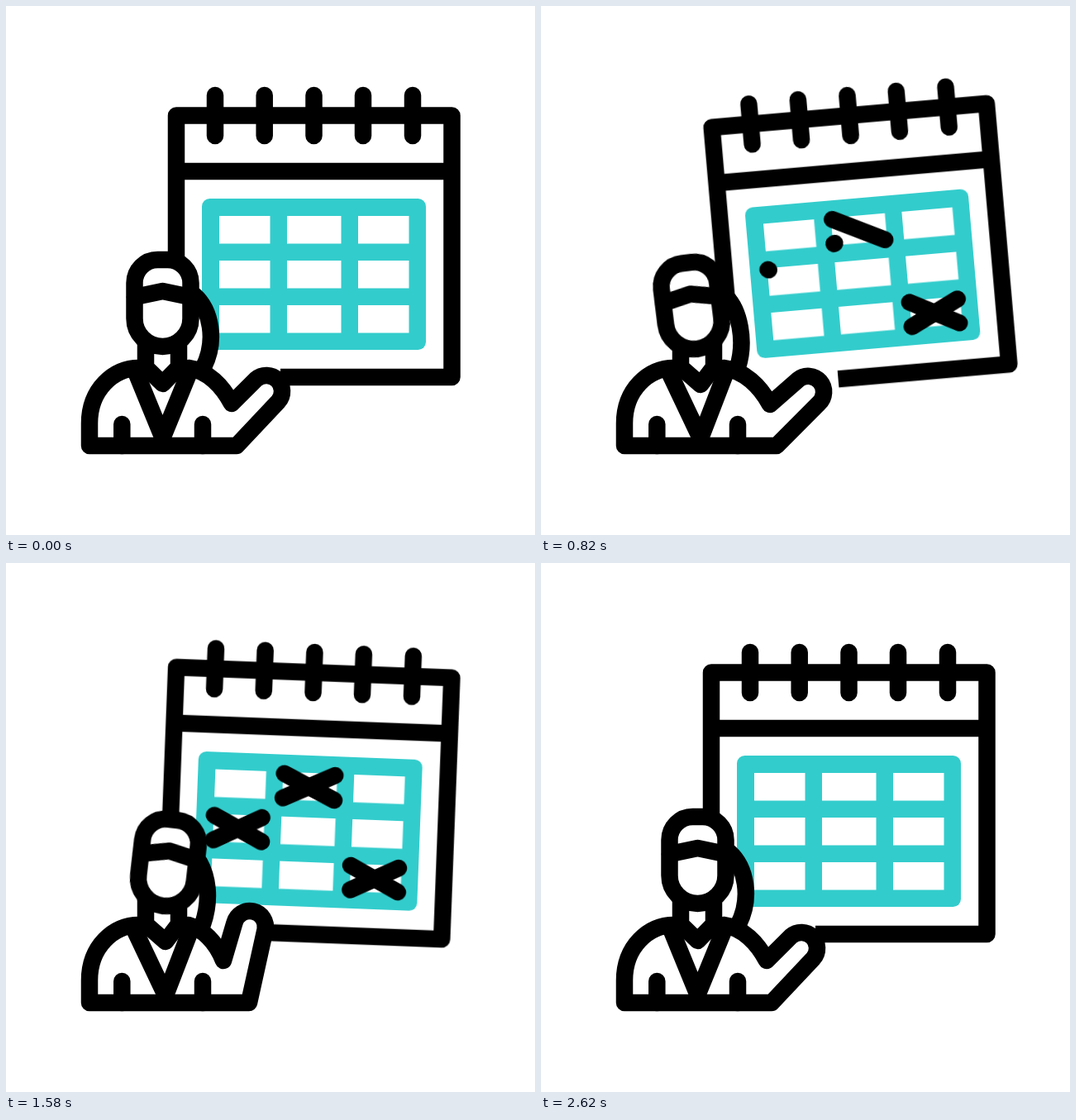
Animation of 640x640 px, one loop 3 s. Source, as an HTML page:

```html
<!DOCTYPE html>
<html lang="en">
<head>
<meta charset="utf-8">
<title>Calendar planning</title>
<style>
  html, body { margin: 0; width: 100%; height: 100%; overflow: hidden; background: #fff; }
  svg { display: block; width: 100vw; height: 100vh; }
  .line { fill: none; stroke: #000; stroke-width: 20.5; stroke-linecap: round; stroke-linejoin: round; }
  .solid { fill: #fff; }
  .butt { stroke-linecap: butt; }

  .cal, .head, .tail, .body, .neck, .lapel, .marks path {
    animation: 3s cubic-bezier(.333, 0, .667, 1) infinite both;
  }
  .cal { transform-origin: 372.5px 132px; animation-name: swing; }
  .head { transform-origin: 189.5px 405px; animation-name: nod; }
  .tail { animation-name: tail; }
  .body { animation-name: body; }
  .neck { animation-name: neck; }
  .lapel { animation-name: lapel; }
  .marks path { stroke-dasharray: 1 2; animation-timing-function: linear; }
  .a1 { animation-name: a1 !important; }
  .a2 { animation-name: a2 !important; }
  .b1 { animation-name: b1 !important; }
  .b2 { animation-name: b2 !important; }
  .c1 { animation-name: c1 !important; }
  .c2 { animation-name: c2 !important; }

  @keyframes swing {
    0%, 7.33% { transform: rotate(0deg); }
    26.67% { transform: rotate(-5deg); }
    46.33% { transform: rotate(5deg); }
    63.5% { transform: rotate(-4deg); }
    80%, 100% { transform: rotate(0deg); }
  }
  @keyframes nod {
    0%, 7.33% { transform: translate(0, 0) rotate(0deg); }
    18%, 27.33% { transform: translate(-1.5px, 3px) rotate(-7deg); }
    38.67%, 53.33% { transform: translate(1.5px, 3px) rotate(6.5deg); }
    69.33%, 73.33% { transform: translate(-1.5px, 3px) rotate(-8deg); }
    86.67%, 100% { transform: translate(0, 0) rotate(0deg); }
  }
  @keyframes tail {
    0%, 7.33% { d: path("M228 350 C248 368 255 405 239 437"); }
    18%, 27.33% { d: path("M224 352 C240 368 248 405 238 437"); }
    38.67%, 53.33% { d: path("M234 362 C243 378 249 405 238 437"); }
    69.33%, 73.33% { d: path("M223 352 C239 368 247 405 238 437"); }
    86.67%, 100% { d: path("M228 350 C248 368 255 405 239 437"); }
  }
  @keyframes body {
    0%, 7.33% { d: path("M221 438 C244 441 262 460 273 481 L302.6 451.6 A19 19 0 0 1 329.4 478.4 L279 532 L101 532 L101 505 C101 464 130 438 161 438"); }
    18% { d: path("M221 438 C246 441 266 460 278 481 L313.8 453.5 A19 19 0 0 1 337.2 483.5 L283 532 L101 532 L101 505 C101 464 130 438 161 438"); }
    27.33% { d: path("M221 438 C246 441 265 460 277 482 L311 452.2 A19 19 0 0 1 336 480.8 L285 532 L101 532 L101 505 C101 464 130 438 161 438"); }
    38.67%, 53.33% { d: path("M221 438 C238 443 254 458 263 481 L276.5 435.2 A19 19 0 0 1 313.5 443.8 L294 532 L101 532 L101 505 C101 464 130 438 161 438"); }
    73.33% { d: path("M221 438 C242 441 260 460 270 480 L296.9 448.3 A19 19 0 0 1 326.1 472.7 L281 532 L101 532 L101 505 C101 464 130 438 161 438"); }
    86.67%, 100% { d: path("M221 438 C244 441 262 460 273 481 L302.6 451.6 A19 19 0 0 1 329.4 478.4 L279 532 L101 532 L101 505 C101 464 130 438 161 438"); }
  }
  @keyframes neck {
    0%, 7.33%, 86.67%, 100% { d: path("M169 408 L169 437 L189.5 457 L209 437 L209 408"); }
    18%, 73.33% { d: path("M169 408 L169 437 L193 458 L209 437 L209 408"); }
  }
  @keyframes lapel {
    0%, 7.33%, 86.67%, 100% { d: path("M158 445 L189.5 522 L221 445"); }
    18%, 73.33% { d: path("M156 445 L193 523 L223 445"); }
  }

  /* Each stroke: hidden (1.2), drawn from 1 to 0, wiped back. */
  @keyframes a1 {
    0%, 8% { stroke-dashoffset: 1.2; } 8.01% { stroke-dashoffset: 1; }
    17.55%, 66.7% { stroke-dashoffset: 0; } 73% { stroke-dashoffset: 1; } 73.01%, 100% { stroke-dashoffset: 1.2; }
  }
  @keyframes a2 {
    0%, 17.55% { stroke-dashoffset: 1.2; } 17.56% { stroke-dashoffset: 1; }
    27.17%, 66.7% { stroke-dashoffset: 0; } 73% { stroke-dashoffset: 1; } 73.01%, 100% { stroke-dashoffset: 1.2; }
  }
  @keyframes b1 {
    0%, 17.55% { stroke-dashoffset: 1.2; } 17.56% { stroke-dashoffset: 1; }
    27.17%, 73.7% { stroke-dashoffset: 0; } 80% { stroke-dashoffset: 1; } 80.01%, 100% { stroke-dashoffset: 1.2; }
  }
  @keyframes b2 {
    0%, 27.17% { stroke-dashoffset: 1.2; } 27.18% { stroke-dashoffset: 1; }
    36.77%, 73.7% { stroke-dashoffset: 0; } 80% { stroke-dashoffset: 1; } 80.01%, 100% { stroke-dashoffset: 1.2; }
  }
  @keyframes c1 {
    0%, 27.17% { stroke-dashoffset: 1.2; } 27.18% { stroke-dashoffset: 1; }
    36.77%, 80.3% { stroke-dashoffset: 0; } 86.6% { stroke-dashoffset: 1; } 86.61%, 100% { stroke-dashoffset: 1.2; }
  }
  @keyframes c2 {
    0%, 36.77% { stroke-dashoffset: 1.2; } 36.78% { stroke-dashoffset: 1; }
    46.4%, 80.3% { stroke-dashoffset: 0; } 86.6% { stroke-dashoffset: 1; } 86.61%, 100% { stroke-dashoffset: 1.2; }
  }
</style>
</head>
<body>
<svg viewBox="0 0 640 640">
  <g class="cal">
    <path class="line butt" d="M206 350 V132.5 H539.5 V449 H332 M206 200 H539.5"/>
    <path class="line" d="M253 108 V157 M312.7 108 V157 M372.5 108 V157 M432 108 V157 M492 108 V157"/>
    <rect x="237" y="233" width="271" height="183" rx="9.5" fill="#33cccc"/>
    <path class="solid" d="M258 254 H319.5 V287.5 H258Z M340 254 H405.5 V287.5 H340Z M426 254 H487.5 V287.5 H426Z
      M258 308 H319.5 V341.5 H258Z M340 308 H405.5 V341.5 H340Z M426 308 H487.5 V341.5 H426Z
      M258 362 H319.5 V395.5 H258Z M340 362 H405.5 V395.5 H340Z M426 362 H487.5 V395.5 H426Z"/>
    <g class="marks">
      <path class="line a1" pathLength="1" d="M426 364 L484 394"/>
      <path class="line a2" pathLength="1" d="M426.5 393.5 L484 365"/>
      <path class="line b1" pathLength="1" d="M341.5 256 L403 286"/>
      <path class="line b2" pathLength="1" d="M341 285.5 L403 256"/>
      <path class="line c1" pathLength="1" d="M258.7 309.7 L317 339.5"/>
      <path class="line c2" pathLength="1" d="M258.7 339.5 L316.5 310.3"/>
    </g>
  </g>

  <path class="solid" d="M200 385 H235 V437 H200Z"/>
  <path class="line solid tail" d="M228 350 C248 368 255 405 239 437"/>
  <path class="line solid body" d="M221 438 C244 441 262 460 273 481 L302.6 451.6 A19 19 0 0 1 329.4 478.4 L279 532 L101 532 L101 505 C101 464 130 438 161 438"/>
  <path class="line" d="M140.3 506 V532 M238 506 V532"/>
  <path class="line lapel" d="M158 445 L189.5 522 L221 445"/>
  <path class="line solid neck" d="M169 408 L169 437 L189.5 457 L209 437 L209 408"/>
  <g class="head">
    <path class="line solid" d="M155.5 335 A28 28 0 0 1 183.5 307 H195.5 A28 28 0 0 1 223.5 335 V378 A34 34 0 0 1 155.5 378Z"/>
    <path class="line" d="M156 352 L189.5 345 L223 352"/>
  </g>
</svg>
</body>
</html>
```
